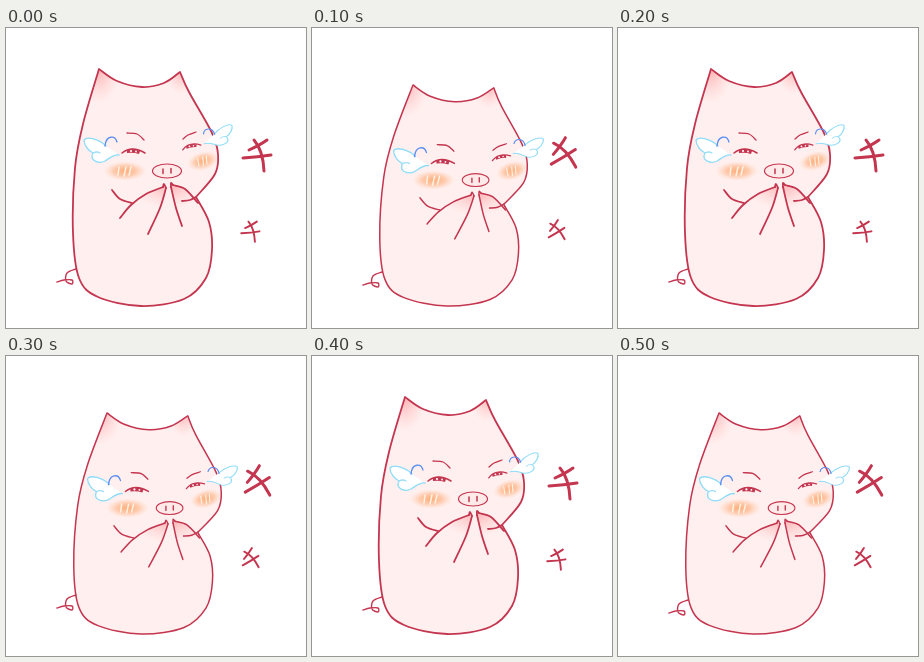
These frames come from a looping animation (300x300 px, 600 ms). An HTML page:

```html
<!DOCTYPE html>
<html lang="en">
<head>
<meta charset="utf-8">
<title>Giggling pig</title>
<style>
html, body { margin: 0; width: 100%; height: 100%; overflow: hidden; background: #fff; }
svg { display: block; width: 100vw; height: 100vh; }
path, ellipse { stroke-linecap: round; stroke-linejoin: round; }
.line { fill: none; stroke: #c4354f; }
.ink { fill: #c4354f; }
.shine { fill: none; stroke: #fff3e4; stroke-width: 1.5; }
</style>
</head>
<body>
<svg id="stage" viewBox="0 0 300 300">
  <defs>
    <radialGradient id="blush">
      <stop offset="0" stop-color="#ffac78"/>
      <stop offset=".5" stop-color="#ffbd96" stop-opacity=".75"/>
      <stop offset="1" stop-color="#ffd9c8" stop-opacity="0"/>
    </radialGradient>
    <radialGradient id="rose">
      <stop offset="0" stop-color="#ffb0b2"/>
      <stop offset="1" stop-color="#ffd0d0" stop-opacity="0"/>
    </radialGradient>
    <radialGradient id="earL" href="#rose" cx=".18" cy="0" r=".15" fx=".18" fy="0"/>
    <radialGradient id="earR" href="#rose" cx=".74" cy="0" r=".11" fx=".74" fy="0"/>
    <radialGradient id="palms" href="#rose" cx=".63" cy="0" r=".5" fx=".63" fy="0"/>
    <g id="tear" stroke-width="1.3">
      <path fill="#fff" stroke="#8fdcf8" d="M3-3C-4-10-16-13-19-9C-19-3-14 2-10 4C-14 12-4 15 2 12C7 9 11 5 16 6"/>
      <path fill="none" stroke="#9fdff8" d="M-10 4Q-6 2-3 4"/>
      <path fill="none" stroke="#5b8df0" d="M2-3C3-14 12-14 14-7"/>
    </g>
    <g id="eye">
      <path class="line" stroke-width="1.5" d="M-11 2Q-1-6 12 2"/>
      <path class="ink" d="M-6-1Q0-4 7 0L6 3Q0 1-6 2Z"/>
      <circle cx="-2" r="1.1" fill="#fff"/><circle cx="3" cy=".5" r=".9" fill="#fff"/>
    </g>
    <g id="cheek">
      <ellipse rx="22" ry="10" fill="url(#blush)"/>
      <path class="shine" d="M-7 4L-6-4M-1 5L1-4M4 4L6-4"/>
    </g>
    <g id="nose" class="line" stroke-width="1.2">
      <ellipse rx="14.5" ry="7" style="fill:#ffeaea"/>
      <path d="M-4-2V2.5M4-2.5V2" stroke-width="1.5"/>
    </g>
    <path id="spark" class="line" stroke-width="3" d="M-4-16Q5-6 6 15M9-16Q2-11-9-6M-15 2Q0 1 13-1"/>
  </defs>
</svg>
<script>
const NS = "http://www.w3.org/2000/svg";
const stage = document.getElementById("stage");
const FLOOR = 278, TALL = 237;

// squashes a point towards the floor and leans it to the right
function warp([x, y], squash) {
  const h = (FLOOR - y) / TALL;
  return [x + 8 * squash * h * Math.abs(h), y + 16 * squash * h];
}

// smooth curve through "x,y" points
function curve(text, squash, start = "M") {
  const p = text.split(" ").map(s => warp(s.split(",").map(Number), squash));
  const at = i => p[Math.max(0, Math.min(p.length - 1, i))];
  const handle = (i, k) => at(i).map((v, a) => v + k * (at(i + 1)[a] - at(i - 1)[a]) / 6);
  return start + p[0] + p.slice(1).map((q, i) =>
    `C${handle(i, 1)} ${handle(i + 1, -1)} ${q}`).join("");
}

const brow = "93,41 111,53 136,59 158,55 174,44";
const face = "174,44 183,64 206,105 212,126 209,146 190,169";
const back = "190,169 203,194 206,222 200,250 178,271 135,278 92,269 73,250 67,205 69,140 77,96 93,41";
const arms = ["114,190 125,177 140,166 157,159", "160,160 154,180 142,206",
              "176,198 170,180 165,159", "167,157 179,161 192,175"];
const creases = ["106,162 114,171 126,175", "190,169 184,172 176,173",
                 "157,159 158,156 160,160", "165,159 165,155 167,157"];
const brows = ["121,105 131,106 138,112", "177,111 182,107 190,104"];
const tail = "70,241 61,245 60,253 66,256 66,252 58,252 51,254";

const place = (id, x, y, squash, more = "") =>
  `<use href="#${id}" transform="translate(${warp([x, y], squash)}) ${more}"/>`;

function pig(squash) {
  const w = 1.8 - .3 * squash;
  const line = (d, width = w) => `<path class="line" stroke-width="${width}" d="${d}"/>`;
  const lines = (list, width) => line(list.map(c => curve(c, squash)).join(""), width);
  const fill = (d, paint) => `<path fill="${paint}" d="${d}"/>`;
  const body = curve(brow, squash) + curve(face, squash, "L") + curve(back, squash, "L") + "Z";
  const hands = curve(arms[0], squash) + curve(arms[1], squash, "L") + "Z"
    + curve(arms[2], squash) + curve(arms[3], squash, "L") + "Z";
  const turn = -25 * squash;
  return ["#fff0ef", "url(#earL)", "url(#earR)"].map(c => fill(body, c)).join("")
    + fill(hands, "url(#palms)")
    + place("cheek", 119, 143, squash)
    + place("cheek", 197, 133, squash, "rotate(-15) scale(.75 .95)")
    + line(body) + lines(arms) + lines(creases) + lines(brows, 1.3)
    + place("eye", 127, 123, squash)
    + place("eye", 185, 118, squash, "rotate(-15) scale(.82)")
    + place("nose", 161, 143, squash, `scale(${1 - .08 * squash})`)
    + place("tear", 97, 121, squash)
    + place("tear", 211, 108, squash, `rotate(${-14 + 8 * squash}) scale(-.9 .75)`)
    + `<use href="#spark" transform="translate(252 128) rotate(${turn})"/>`
    + `<use href="#spark" transform="translate(245 204) rotate(${turn}) scale(.65)"/>`;
}

const STEP = 100, COUNT = 6;

// shows a group only during the listed steps of the loop
function show(markup, steps) {
  const g = document.createElementNS(NS, "g");
  g.innerHTML = markup;
  stage.append(g);
  const keys = Array.from({ length: COUNT + 1 }, (_, i) => ({
    offset: i / COUNT,
    opacity: steps.includes(i % COUNT) ? 1 : 0,
    easing: "steps(1, end)"
  }));
  g.animate(keys, { duration: STEP * COUNT, iterations: Infinity });
}

const curl = lift =>
  `<path class="line" stroke-width="1.4" transform="translate(0 ${lift})" d="${curve(tail, 0)}"/>`;

show(pig(0) + curl(0), [0, 2, 4]);
show(pig(1), [1, 3, 5]);
show(curl(3), [1, 5]);
show(curl(-2), [3]);
</script>
</body>
</html>
```
